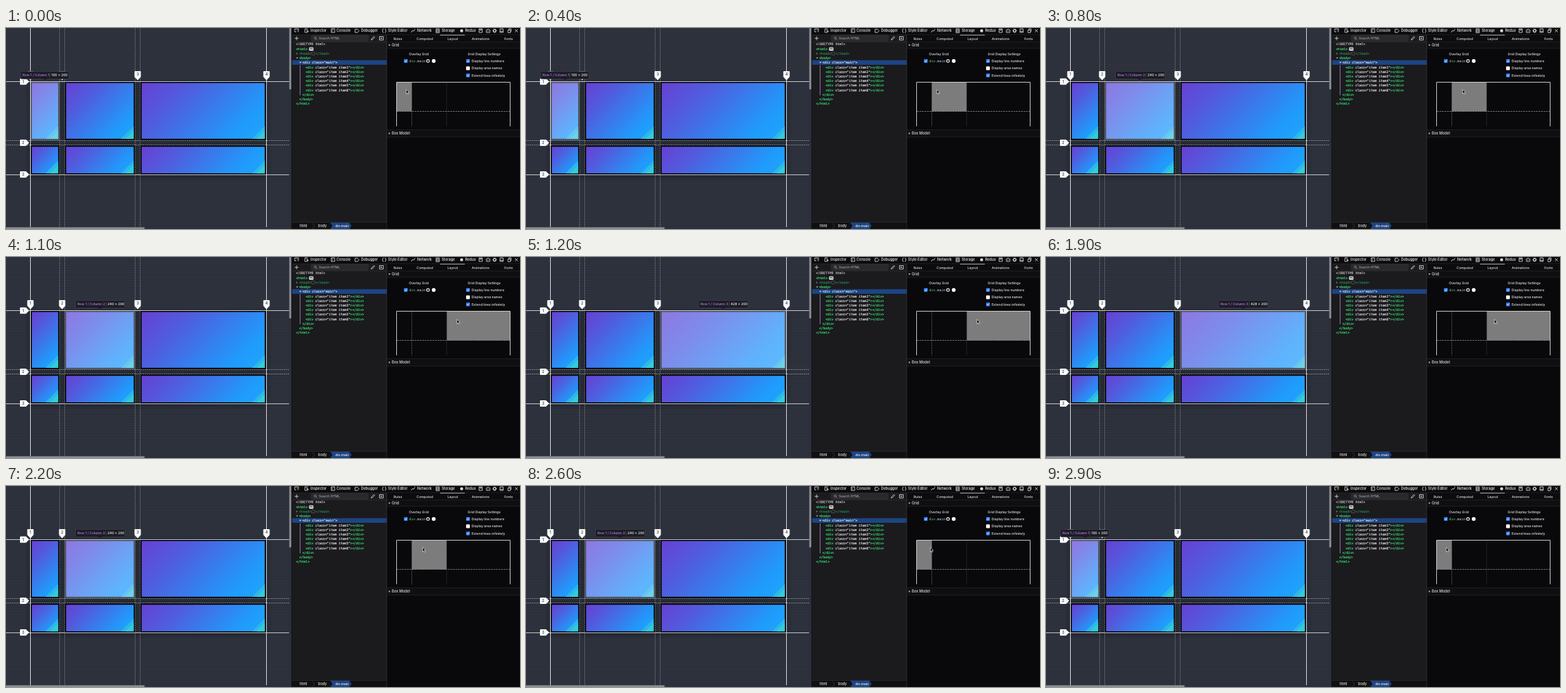
Recreate the animation shown at these times as an HTML page. Size 810 by 317 pixels, loop 3000 ms.

```html
<!DOCTYPE html>
<html lang="en">
<head>
<meta charset="utf-8">
<title>Grid inspector</title>
<style>
html, body { margin: 0; width: 100%; height: 100%; overflow: hidden; background: #0b0b0d; }
svg { display: block; width: 810px; height: 317px; }
text { font-family: Inter, "Open Sans", sans-serif; font-weight: 500; fill: #e6e6e8; white-space: pre; }
.mono { font-family: "DejaVu Sans Mono", monospace; font-weight: 400; }
.code { stroke: currentColor; stroke-width: .14; }
</style>
</head>
<body>
<svg id="stage" viewBox="0 0 810 317" xmlns="http://www.w3.org/2000/svg"></svg>
<script>
const stage = document.getElementById('stage');
const out = [];
let defs = '';
const BLUE = '#1d4583', PALE = '#d8d8da';

const add = s => out.push(s);
const rect = (x, y, w, h, fill, more = '') =>
  add(`<rect x="${x}" y="${y}" width="${w}" height="${h}" fill="${fill}" ${more}/>`);
const line = (x1, y1, x2, y2, color, more = '') =>
  add(`<path d="M${x1} ${y1}L${x2} ${y2}" stroke="${color}" fill="none" ${more}/>`);
const path = (d, color = PALE, more = 'stroke-width=".9"') =>
  add(`<path d="${d}" stroke="${color}" fill="none" ${more}/>`);
const shape = (d, fill, more = '') => add(`<path d="${d}" fill="${fill}" ${more}/>`);
// y is the vertical middle of the text
const text = (x, y, s, size = 5.2, fill = '#e6e6e8', more = '') =>
  add(`<text x="${x}" y="${y + size * 0.36}" font-size="${size}" style="fill:${fill};color:${fill}" ${more}>${s}</text>`);
const mid = 'text-anchor="middle"';

const cols = [[38.5, 84.5], [92.5, 203.5], [211.5, 410]];
const rows = [[84.5, 177], [185, 231.5]];
const INSET = 2.3;

function drawTile(x0, x1, y0, y1, id) {
  const x = x0 + INSET, y = y0 + INSET, w = x1 - x0 - 2 * INSET, h = y1 - y0 - 2 * INSET;
  const cx = x + w / 2, cy = y + h / 2, r = (w + h) / 4;
  defs += `<linearGradient id="${id}" gradientUnits="userSpaceOnUse" x1="${cx - r}" y1="${cy - r}" x2="${cx + r}" y2="${cy + r}">
    <stop offset="0" stop-color="#6740d3"/><stop offset=".3" stop-color="#4f5ede"/>
    <stop offset=".8" stop-color="#1f9bfc"/><stop offset="1" stop-color="#1fa6fa"/></linearGradient>`;
  rect(x0, y0, x1 - x0, y1 - y0, '#050609');
  rect(x, y, w, h, `url(#${id})`);
  const rx = x + w, by = y + h;
  shape(`M${rx} ${by - 20}V${by}H${rx - 20}Z`, '#2cb8e8');
  shape(`M${rx} ${by - 13}V${by}H${rx - 13}Z`, '#34cbd8');
}

function drawPage() {
  rect(0, 0, 450, 317, '#2b303b');
  for (let y = 1.5; y < 317; y += 4) line(0, y, 450, y, '#2f3440');

  rect(37, 86, 375, 149, '#14171e', 'opacity=".5" filter="url(#soft)"');
  rect(38, 84, 372.5, 148, '#21252d');

  defs += `<pattern id="hatch" width="4" height="4" patternUnits="userSpaceOnUse">
    <path d="M-1 1L1 -1M0 4L4 0M3 5L5 3" stroke="#484c55" stroke-width=".6"/></pattern>
    <filter id="soft" x="-5%" y="-10%" width="110%" height="125%"><feGaussianBlur stdDeviation="3"/></filter>`;
  for (const x of [84.5, 203.5]) rect(x, 84, 8, 148, 'url(#hatch)');
  rect(38, 177, 372, 7.5, 'url(#hatch)');

  rows.forEach(([y0, y1], j) => cols.forEach(([x0, x1], i) =>
    drawTile(x0, x1, y0, y1, `g${j}${i}`)));
  add('<rect id="lit" y="84.5" height="92.5" fill="#d9e2ff" opacity=".34"/>');

  const dash = 'stroke-dasharray="2 1" stroke-width=".8"';
  for (const x of [84.5, 92.5, 203.5, 211.5]) line(x, 0, x, 317, '#7d828b', dash);
  for (const y of [177.5, 184.5]) line(0, y, 446, y, '#9a9da4', dash);
  for (const x of [38.5, 410.5]) line(x, 0, x, 317, '#e4e5e8');
  for (const y of [84.5, 231.5]) line(0, y, 446, y, '#d0d2d6');

  const ink = '#26262b';
  [38.5, 88.5, 207.5, 410.5].forEach((x, i) => {
    shape(`M${x - 4} 68h8q1 0 1 1v8l-5 5.5l-5 -5.5v-8q0 -1 1 -1Z`, '#fbfbfd');
    text(x, 73, i + 1, 5.6, ink, mid);
  });
  [84.5, 181, 231].forEach((y, i) => {
    shape(`M23 ${y - 5}h8.5l5 5l-5 5h-8.5q-1 0 -1 -1v-8q0 -1 1 -1Z`, '#fbfbfd');
    text(27, y, i + 1, 5.6, ink, mid);
  });

  rect(446, 0, 4, 317, '#2b303b');
  rect(446.4, 0, 3.2, 97, '#8b8d92', 'rx="1.5"');
  rect(0, 314, 450, 3, '#2b303b');
  rect(0, 314.3, 218.5, 2.7, '#8b8d92', 'rx="1.2"');

  add(`<path id="tipBox" fill="#1c1d25" stroke="#4a4c56" stroke-width=".6"/>
    <text id="tipName" y="76.4" font-size="5.3" style="fill:#c477f4"></text>
    <path id="tipBar" stroke="#6b6d78" stroke-width=".6"/>
    <text id="tipSize" y="76.4" font-size="5.3" style="fill:#f4f4f6"></text>`);
}

function drawToolbar() {
  rect(450, 0, 360, 317, '#1b1b1e');
  rect(450, 0, 360, 11, '#0c0c0e');
  line(450, 10.8, 810, 10.8, '#34343a', 'stroke-width=".6"');
  const labels = [['Inspector', 480], ['Console', 521], ['Debugger', 559.5], ['Style Editor', 602],
    ['Network', 648], ['Storage', 686.5], ['Redux', 723.5]];
  for (const [s, x] of labels) text(x, 4.2, s, 5.6, '#f0f0f2');

  path('M461 4.5V1.5H455V6H457.5M458.5 3.5L461.5 6.5');
  path('M475.5 1.5H471V7H475.5M474 3L477 5.5L474.5 6Z');
  path('M512.5 1.5h5.5v5.5h-5.5zM513.7 3l1.4 1.3l-1.4 1.3');
  path('M550 2h4l2.5 2.5l-2.5 2.5h-4z');
  path('M595 1.5q-1.3 0 -1.3 1.5q0 1.3 -.9 1.4q.9 .1 .9 1.4q0 1.5 1.3 1.5M597 1.5q1.3 0 1.3 1.5q0 1.3 .9 1.4q-.9 .1 -.9 1.4q0 1.5 -1.3 1.5');
  path('M638.5 7l2 -3l2 1l2 -3.5');
  path('M677.8 1.5h5v6h-5zM677.8 3.5h5M677.8 5.5h5');
  add(`<circle cx="718" cy="4.4" r="2.4" fill="${PALE}"/>`);
  path('M745.5 1.5h5v5.5h-5zM747 1.5v2h2v-2');
  path('M757 3h1l.7 -1h2l.7 1h1.2v4h-5.6zM759.7 4v1.6');
  add(`<circle cx="770" cy="4.3" r="2" fill="none" stroke="${PALE}" stroke-width="1.3"/>
    <circle cx="770" cy="4.3" r="2.9" fill="none" stroke="${PALE}" stroke-width=".9" stroke-dasharray="1.1 1.2"/>`);
  path('M778.5 1.5h5v5.5h-5zM778.5 5.3h5');
  path('M791 3.3h4v4h-4zM792.3 3v-1.5h3.7v4h-1');
  path('M802 2l4.6 4.6M806.6 2l-4.6 4.6');
}

function drawTree() {
  path('M455 16.3h6M458 13.3v6');
  rect(481, 11.8, 90, 9, '#29292d', 'rx="2.5" stroke="#3b3b41" stroke-width=".6"');
  add('<circle cx="487.3" cy="15.7" r="1.6" fill="none" stroke="#a9a9ae" stroke-width=".7"/>');
  path('M488.5 17l1.7 1.7', '#a9a9ae', 'stroke-width=".8"');
  text(493, 16.3, 'Search HTML', 5.1, '#a3a3a8');
  path('M575.5 19l.6 -1.8l3.7 -3.8l1.2 1.2l-3.7 3.8z');
  path('M588.5 13.5h6v5.5h-6z');
  shape('M590.5 14.6v3.2l2.4 -1.6z', PALE);
  line(450, 22, 600, 22, '#37373c', 'stroke-width=".6"');

  rect(451, 50.8, 149, 7.2, BLUE);
  const code = (x, y, s, fill = '#3cf07c', more = '') =>
    text(x, y, s, 5.1, fill, 'class="mono code" ' + more);
  const open = (name, cls) =>
    `&lt;${name}<tspan style="fill:#f0f0f4;color:#f0f0f4"> class="${cls}"</tspan>&gt;`;
  const arrow = (x, y, down, fill = '#9a9aa0') =>
    shape(down ? `M${x - 1.8} ${y - 1}h3.6l-1.8 2.4z` : `M${x - 1} ${y - 1.8}v3.6l2.4 -1.8z`, fill);

  code(457, 25.6, '&lt;!DOCTYPE html&gt;', '#d4d4d8', 'font-style="italic"');
  code(457, 33, '&lt;html&gt;');
  rect(477.5, 30.3, 7, 5.6, '#d2d2d6', 'rx="1.5"');
  text(481, 33, 'ev', 4, '#2b2b30', mid);
  arrow(458.5, 40.2, false, '#6e6e74');
  code(462, 40.2, '&lt;head&gt;', '#2b8950');
  rect(481, 37.9, 6, 4.6, 'none', 'rx="1.5" stroke="#77777d" stroke-width=".6"');
  text(484, 39.5, '…', 4, '#8c8c92', mid);
  code(488, 40.2, '&lt;/head&gt;', '#2b8950');
  arrow(458.8, 47.3, true);
  code(462, 47.3, '&lt;body&gt;');
  arrow(463.8, 54.4, true, '#dadade');
  code(467, 54.4, open('div', 'main'), '#f0f0f4');
  line(463.5, 58.5, 463.5, 106, '#a583bd', 'stroke-width=".9"');
  for (let i = 0; i < 6; i++)
    code(472, 61.7 + i * 7.2, open('div', 'item item' + (i + 1)) + '&lt;/div&gt;');
  code(467, 104.8, '&lt;/div&gt;');
  code(462, 112, '&lt;/body&gt;');
  code(457, 119.2, '&lt;/html&gt;');

  rect(450, 306.5, 150, 10.5, '#101013');
  line(450, 306.5, 600, 306.5, '#34343a', 'stroke-width=".6"');
  shape('M511 307h30l3.5 5l-3.5 5h-30l3.5 -5z', BLUE);
  path('M483 307.5l3 4.7l-3 4.7', '#4a4a50', 'stroke-width=".6"');
  text(463, 312.4, 'html', 5.5);
  text(492, 312.4, 'body', 5.5);
  text(519, 312.4, 'div.main', 5.3, '#f4f4f6');
  line(450.3, 0, 450.3, 317, '#101013', 'stroke-width=".8"');
}

function checkbox(x, y, on) {
  rect(x, y - 3, 6, 6, on ? '#2f7df0' : '#f4f4f6', 'rx="1.2"');
  if (on) path(`M${x + 1.4} ${y}l1.2 1.4l2 -2.8`, '#fff');
}

function drawSidebar() {
  rect(600, 11, 210, 306, '#09090b');
  rect(600, 11, 210, 11, '#0c0c0e');
  rect(684, 10.7, 39, 1, '#b9b9be');
  [['Rules', 617.5], ['Computed', 660], ['Layout', 704], ['Animations', 748], ['Fonts', 792]]
    .forEach(([s, x]) => text(x, 16.7, s, 5.2, '#e0e0e4', mid));
  for (const [y, s, down] of [[22, 'Grid', true], [160.5, 'Box Model', false]]) {
    const h = down ? 10 : 11.5, cy = y + h / 2;
    rect(600, y, 210, h, '#0f0f12');
    for (const e of [y, y + h]) line(600, e, 810, e, '#2c2c31', 'stroke-width=".6"');
    shape(down ? `M602.3 ${cy - 1}h3.8l-1.9 2.5z` : `M603.3 ${cy - 1.9}v3.8l2.5 -1.9z`, '#a8a8ae');
    text(608, cy, s, 5.7, '#e2e2e6');
  }
  line(600, 11, 600, 317, '#3a3a40', 'stroke-width=".7"');

  text(650.5, 41.3, 'Overlay Grid', 5.2, '#e6e6e8', mid);
  text(753.5, 41.3, 'Grid Display Settings', 5.2, '#e6e6e8', mid);
  checkbox(627, 52, true);
  text(635.3, 51.8, 'div<tspan style="fill:#c3d5f7">.main</tspan>', 5.3, '#67e0a0', 'class="mono"');
  add('<circle cx="665" cy="52" r="2.2" fill="none" stroke="#f0f0f2" stroke-width="1.2"/>' +
    '<circle cx="674" cy="52" r="3" fill="#fff"/>');
  [['Display line numbers', 52, true], ['Display area names', 63.4, false], ['Extend lines infinitely', 74.8, true]]
    .forEach(([s, y, on]) => { checkbox(725, y, on); text(733.7, y, s); });

  add('<rect id="cell" y="86" height="45.5" fill="#7c7c7c"/>');
  const dash = 'stroke-dasharray="3 1" stroke-width=".8"';
  line(639.5, 86, 639.5, 155, '#5c5c60', dash);
  line(694.5, 86, 694.5, 155, '#333337', dash);
  line(616, 131.5, 795, 131.5, '#8d8d91', dash);
  path('M615.5 155V85.5H794.5V155', '#d6d6d8', 'stroke-width="1"');
  shape('M0 0V6.6L1.6 5.2L2.7 7.6L3.9 7L2.8 4.7H4.9Z', '#08080a',
    'id="cursor" stroke="#fff" stroke-width=".6"');
}

drawPage();
drawToolbar();
drawTree();
drawSidebar();
stage.innerHTML = `<defs>${defs}</defs>` + out.join('');

const el = id => document.getElementById(id);
const set = (id, attrs) => {
  for (const k in attrs) el(id).setAttribute(k, attrs[k]);
};

const ease = (t, a, b) => {
  const u = Math.min(1, Math.max(0, (t - a) / (b - a)));
  return u * u * (3 - 2 * u);
};
const cursorAt = t => {
  const near = ease(t, 100, 600) - ease(t, 2400, 2700);
  const far = ease(t, 800, 1100) - ease(t, 1850, 2150);
  return [630.5 + 26 * near + 54 * far, 97 + 1.5 * far];
};
const cellAt = t => {
  const x = cursorAt(t)[0];
  return x < 639 ? 0 : x < 695 ? 1 : 2;
};

const edges = [616, 639.5, 694.5, 794];
const tips = [
  { x: 23, w: 76, size: '100 × 200' },
  { x: 109.5, w: 78, size: '240 × 200' },
  { x: 272, w: 78, size: '428 × 200' }
];
const LAG = 200; // the page highlight follows the panel late

function render(ms) {
  const t = Math.floor(ms % 3000 / 100) * 100;
  const [cx, cy] = cursorAt(t);
  set('cursor', { transform: `translate(${cx} ${cy})` });
  const c = cellAt(t);
  set('cell', { x: edges[c], width: edges[c + 1] - edges[c] });

  const p = cellAt(Math.max(0, t - LAG));
  const [x0, x1] = cols[p], tip = tips[p], m = (x0 + x1) / 2;
  set('lit', { x: x0, width: x1 - x0 });
  const r = tip.x + tip.w;
  set('tipBox', { d: `M${tip.x + 2} 68.5H${r - 2}q2 0 2 2V78.5q0 2 -2 2H${m + 4}l-4 2.5l-4 -2.5H${tip.x + 2}q-2 0 -2 -2V70.5q0 -2 2 -2Z` });
  set('tipName', { x: tip.x + 3 });
  set('tipSize', { x: r - 27.5 });
  set('tipBar', { d: `M${r - 29.8} 71.5v6` });
  el('tipName').textContent = 'Row 1 / Column ' + (p + 1);
  el('tipSize').textContent = tip.size;
}

const start = performance.now();
function tick() {
  render(performance.now() - start);
  requestAnimationFrame(tick);
}
render(0);
requestAnimationFrame(tick);
</script>
</body>
</html>
```
